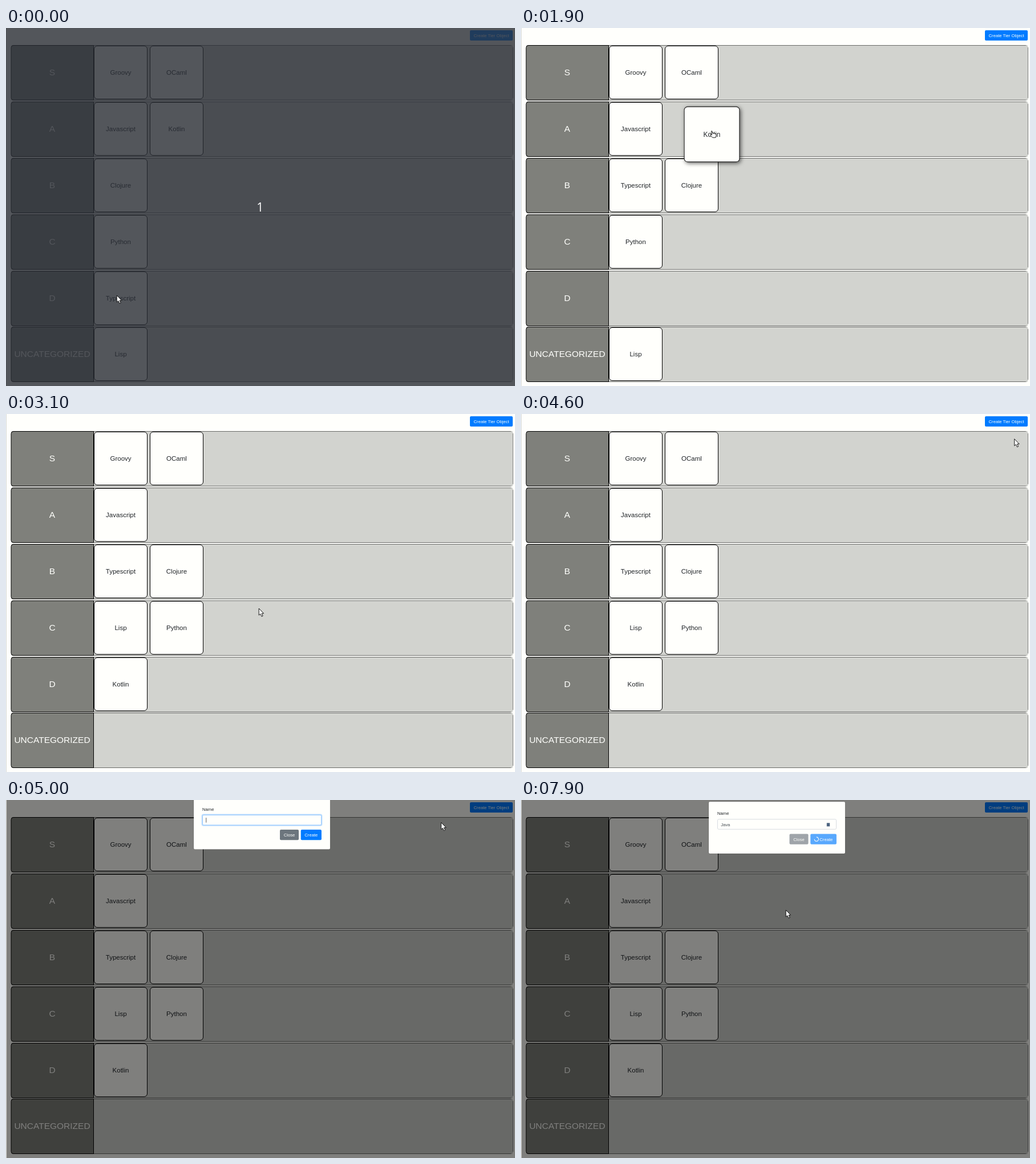
Recreate the animation shown at these times as an HTML page. Size 892 by 628 pixels, loop 8000 ms.

```html
<!DOCTYPE html>
<html lang="en">
<head>
<meta charset="utf-8">
<title>Tier list</title>
<style>
  html, body { margin: 0; width: 100%; height: 100%; overflow: hidden; background: #fffffc; }
  svg { display: block; width: 892px; height: 628px; font: 7.65px "Liberation Sans", Arial, sans-serif; }
  .mid { text-anchor: middle; }
  .label { font-size: 15.5px; fill: #fffffc; }
  .card { font-size: 11.5px; fill: #212529; }
  .card rect { fill: #fffffc; stroke: #000; }
  .card .mark { fill: none; stroke: none; }
  .drag { filter: drop-shadow(2px 2px 3.5px rgba(0, 0, 0, .6)); }
  .drag .face { stroke: #222; }
  .drag .mark { fill: #3390f0; }
  .drag .sel { fill: #fffffc; }
  .btn { fill: #fffffc; text-anchor: middle; }
  .pointer { fill: #fff; stroke: #000; stroke-width: .9; stroke-linejoin: round; }
  #count { font: 21px "Open Sans", "Noto Sans", sans-serif; fill: #fff; }
</style>
</head>
<body>
<svg viewBox="0 0 892 628">
  <rect width="892" height="628" fill="#fffffc"/>
  <rect width="1" height="628" fill="#d9dad6"/>
  <g id="board"></g>
  <g class="btn">
    <rect id="open" x="813" y="4" width="75" height="18" rx="2"/>
    <text x="850.6" y="15.6">Create Tier Object</text>
  </g>
  <g id="cards"></g>
  <rect id="dim" x="1" width="891" height="628"/>

  <g id="modal">
    <rect x="329" y="3" width="239" height="91" rx="2" fill="#fffffc" stroke="#000" stroke-opacity=".2" stroke-width=".5"/>
    <text x="344" y="26.3" fill="#212529">Name</text>
    <rect id="ring" x="343.6" y="32.9" width="209.8" height="19.3" rx="2.5" fill="none" stroke="#007bff" stroke-opacity=".25" stroke-width="2"/>
    <rect id="field" x="344.5" y="33.8" width="208" height="17.5" rx="2" fill="#fffffc" stroke-width=".8"/>
    <text id="typed" x="350.2" y="45.5" fill="#495057"></text>
    <rect id="caret" y="38.5" width=".8" height="8.5" fill="#333"/>
    <rect id="icon" x="535.8" y="40.3" width="5.4" height="6" fill="#4d6480"/>
    <g id="close" class="btn">
      <rect x="480" y="59.5" width="33" height="18.2" rx="2" fill="#6c757d"/>
      <text x="496.5" y="71.5">Close</text>
    </g>
    <g id="create" class="btn">
      <rect id="createBox" y="59.5" height="18.2" rx="2"/>
      <text x="534.8" y="71.5">Create</text>
      <circle id="spin" r="3.6" fill="none" stroke="#fffffc" stroke-width="1.1" pathLength="4" stroke-dasharray="3 1"/>
    </g>
  </g>

  <g id="countdown">
    <rect width="892" height="628" fill="#282c34" fill-opacity=".8"/>
    <text id="count" class="mid" x="445.3" y="322">1</text>
  </g>
  <path id="arrow" class="pointer" d="M.2 0V12L2.9 9.7 5 14.2 7.1 13.2 5.1 8.9H8.7Z"/>
  <path id="hand" class="pointer" d="M-.6 1Q.7 -.1 1.2 1.5L2 4.7 6 5.2Q8 5.6 8 7.5V9.6L7 12.2H1.6L-2.4 8Q-2.8 6.8 -1.6 6.7L.6 7.5Z"/>
</svg>
<script>
const LOOP = 8000, TICK = 100;
const $ = id => document.getElementById(id);
const set = (id, attrs) => { for (const k in attrs) $(id).setAttribute(k, attrs[k]); };
const show = (id, on) => set(id, { visibility: on ? 'inherit' : 'hidden' });
const clamp = (v, max = 1) => Math.min(max, Math.max(0, v));
const rowTop = i => Math.floor(30.9 + 98.8 * i);

const labels = ['S', 'A', 'B', 'C', 'D', 'UNCATEGORIZED'];
const tiers = [['Groovy', 'OCaml'], ['Javascript', 'Kotlin'], ['Clojure'], ['Python'], ['Typescript'], ['Lisp']];

// A held card keeps its offset from the pointer and lands first in its new row.
const moves = [
  { name: 'Typescript', start: 500, end: 900, row: 2, dx: 19, dy: -17 },
  { name: 'Kotlin', start: 1900, end: 2400, row: 4, dx: .5, dy: 6.5 },
  { name: 'Lisp', start: 2800, end: 3100, row: 3, dx: -3, dy: 4 }
];

// Pointer glides: start, end, x, y
const glides = [
  [0, 0, 194, 469], [400, 600, 324, 374], [600, 800, 433, 275],
  [1000, 1400, 342, 189], [1500, 1700, 331, 180], [1800, 1900, 334, 180],
  [1900, 2300, 300, 470], [2300, 2600, 201, 559], [2700, 3000, 443, 341],
  [3600, 3700, 427, 368], [3700, 4000, 842, 118], [4300, 4700, 872, 19],
  [4900, 5100, 653, 60], [5200, 5400, 576, 54], [6800, 7200, 533, 67], [7700, 7900, 464, 193]
];

function pointer(t) {
  let x = 0, y = 0;
  for (const [start, end, toX, toY] of glides) {
    if (t < start) break;
    const k = clamp((t - start) / (end - start || 1)) || +(end === start);
    x += (toX - x) * k;
    y += (toY - y) * k;
  }
  return [x, y];
}

function layout(t) {
  const rows = tiers.map(r => [...r]);
  for (const m of moves) {
    if (t < m.end) continue;
    for (const r of rows) if (r.includes(m.name)) r.splice(r.indexOf(m.name), 1);
    rows[m.row].unshift(m.name);
  }
  return rows;
}

$('board').innerHTML = labels.map((name, i) => {
  const y = rowTop(i);
  return `<rect x="9" y="${y}" width="150" height="97" rx="4" fill="#7f807b"/>
    <rect x="9" y="${y + .5}" width="879" height="96" rx="4" fill="none" stroke="#000"/>
    <rect x="154" y="${y + .5}" width="734" height="96" fill="#d2d3cf"/>
    <path d="M153.5 ${y}v97" stroke="#000"/>
    <text class="label mid" x="81" y="${y + 53.3}">${name}</text>`;
}).join('');

const cards = {};
for (const name of tiers.flat()) {
  const g = document.createElementNS('http://www.w3.org/2000/svg', 'g');
  const marked = name === 'Typescript';
  g.innerHTML = `<rect class="face" x="-46.5" y="-46.5" width="93" height="93" rx="5.5"/>
    ${marked ? '<rect class="mark" x="-7.6" y="-9.2" width="12.2" height="17.6"/>' : ''}
    <text y="4.1">${marked ? 'Typ<tspan class="sel">es</tspan>cript' : name}</text>`;
  cards[name] = $('cards').appendChild(g);
}

function placeCards(t, [px, py]) {
  const held = moves.find(m => t >= m.start && t < m.end);
  layout(t).forEach((row, i) => row.forEach((name, slot) => {
    const lift = held && held.name === name;
    const x = lift ? px + held.dx : 201 + 98 * slot;
    const y = lift ? py + held.dy : rowTop(i) + 48;
    const scale = lift ? 1.04 + .16 * clamp((t - held.start) / 100) : 1;
    cards[name].setAttribute('transform', `translate(${x} ${y}) scale(${scale})`);
    cards[name].setAttribute('class', lift ? 'card mid drag' : 'card mid');
    if (lift && cards[name].nextSibling) $('cards').append(cards[name]);
  }));
  show('arrow', !held);
  show('hand', held);
}

function drawModal(t) {
  const fade = clamp((t - 4850) / 150);
  const slide = -24 * (1 - clamp((t - 4850) / 300)) ** 1.7;
  set('dim', { 'fill-opacity': fade / 2 });
  set('modal', { opacity: fade, transform: `translate(0 ${slide})` });

  const focus = t >= 5000 && t < 7300, busy = t >= 7400;
  const letters = clamp(Math.floor((t - 5700) / 200), 4);
  show('ring', focus);
  set('field', { stroke: focus ? '#80bdff' : '#ced4da' });
  $('typed').textContent = 'Java'.slice(0, letters);
  set('caret', { x: 350.4 + (letters ? $('typed').getComputedTextLength() : 0) });
  show('caret', t < 7300);
  set('icon', { opacity: clamp((t - 5850) / 300) });

  const wide = busy ? 9.5 : 0;
  set('close', { opacity: busy ? .65 : 1, transform: `translate(${-wide} 0)` });
  set('create', { opacity: busy ? .65 : 1 });
  set('createBox', { x: 516.7 - wide, width: 36.2 + wide, fill: t >= 7100 && !busy ? '#0069d9' : '#007bff' });
  set('spin', { transform: `translate(517.8 68.7) rotate(${270 + (t - 7900) * .48})` });
  show('spin', busy);
}

function draw(t) {
  const spot = pointer(t);
  placeCards(t, spot);
  set('arrow', { transform: `translate(${spot})` });
  set('hand', { transform: `translate(${spot})` });
  set('open', { fill: t >= 4700 && t < 5000 ? '#0069d9' : '#007bff' });
  show('countdown', t < 100);
  drawModal(t);
}

const begin = performance.now();
function frame(now) {
  draw(Math.floor(Math.max(0, now - begin) % LOOP / TICK) * TICK);
  requestAnimationFrame(frame);
}
draw(0);
requestAnimationFrame(frame);
</script>
</body>
</html>
```
